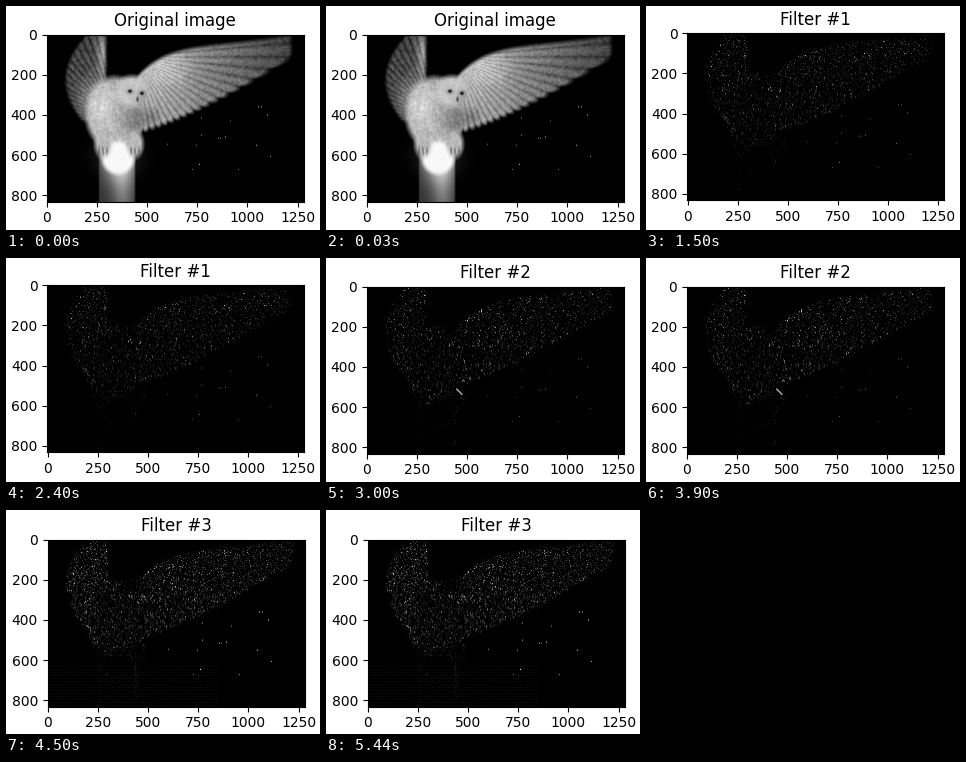
Recreate the animation shown at these times as a matplotlib script. Size 314 by 224 pixels, loop 6060 ms.

```python
import numpy as np
import matplotlib.pyplot as plt
from matplotlib.animation import FuncAnimation

STAGE_W, STAGE_H, DPI = 314, 224, 100
W, H, S = 257, 167, 2          # picture size in pixels, supersampling
X0, Y0 = 41, 29                # stage position of the picture

rng = np.random.default_rng(7)
rows, cols = np.mgrid[0:H * S, 0:W * S]
X = X0 + (cols + 0.5) / S
Y = Y0 + (rows + 0.5) / S

stars = [(int(x), int(y)) for x, y in
         zip(rng.uniform(120, 235, 16), rng.uniform(70, 135, 16))
         if y > 115 - 0.4 * x]


def blur(a, n):
    kernel = np.bartlett(2 * n + 3)[1:-1]
    kernel /= kernel.sum()

    def smooth(line):
        return np.convolve(np.pad(line, n, mode="edge"), kernel, "valid")

    return np.apply_along_axis(smooth, 1, np.apply_along_axis(smooth, 0, a))


def inside(*distances, soft=2):
    """Soft mask of the points where every distance is positive."""
    return np.prod([np.clip(d / soft + 0.5, 0, 1) for d in distances], axis=0)


def ellipse(x, y, rx, ry, soft=0.15):
    d = np.hypot((X - x) / rx, (Y - y) / ry)
    return np.clip((1 + soft - d) / (2 * soft), 0, 1)


def glow(x, y, rx, ry):
    return np.exp(-((X - x) / rx) ** 2 - ((Y - y) / ry) ** 2)


def barbs(x, y, count):
    """Feather lines fanning out from a pivot."""
    return np.abs(np.sin(count * np.arctan2(Y - y, X - x))) ** 0.6


def shrink(a):
    return a.reshape(H, S, W, S).mean(axis=(1, 3))


def draw_owl():
    pic = np.zeros_like(X)

    def paint(tone, mask):
        pic[:] = pic * (1 - mask) + tone * mask

    mottle = blur(rng.normal(0, 1, X.shape), 2) * 0.13

    column = inside(X - 93, 129 - X, Y - 148)
    paint(0.2 + 0.5 * glow(114, 150, 15, 30) + 0.2 * glow(117, 190, 10, 45),
          column)

    # Raised wing
    edge = 60 + 20 * ((Y - 75) / 44) ** 2
    left = inside(X - edge, 100 - X, 116 - Y, soft=4)
    paint(0.1 + 0.2 * barbs(112, 112, 36) + 0.35 * glow(97, 48, 6, 22)
          + 0.4 * glow(92, 95, 18, 22) + mottle, left)

    # Spread wing
    t = np.clip((X - 130) / 155, 0, 1)
    top = 31 + 12 * (1 - t ** 2) + 30 * (1 - t) ** 6
    bottom = 124 - 74 * t ** 1.3
    feathers = barbs(130, 52, 34)
    right = inside(X - 130, 285 - X, Y - top, bottom + 3 * feathers - Y,
                   soft=5)
    paint(0.52 - 0.4 * t + (0.24 - 0.08 * t) * feathers
          + 0.15 * glow(160, 62, 25, 20) - 0.2 * glow(143, 112, 10, 10)
          + mottle, right)

    body = ellipse(109, 108, 29, 36, 0.1)
    paint(0.66 + 0.16 * glow(95, 102, 16, 26) - 0.2 * glow(132, 116, 14, 14)
          + 1.2 * mottle, body)

    head = ellipse(126, 86, 16, 15, 0.2)
    paint(0.78 - 0.15 * glow(138, 94, 9, 10) + 0.5 * mottle, head)
    for x, y in [(124, 86), (136, 88)]:
        paint(0.45, 0.5 * ellipse(x, y, 4, 3, 0.4))
        paint(0.08, ellipse(x, y, 1.8, 1.4, 0.4))
    paint(0.2, 0.8 * ellipse(131.5, 94, 1.2, 2.5, 0.4))

    # Lamp under the feet
    pic[:] += 0.2 * glow(112, 151, 20, 18)
    paint(0.97, ellipse(112, 152, 16, 16))
    for x in (97, 129):
        paint(0.72 + mottle, ellipse(x, 138, 8, 13, 0.3))
        for dx in (-4, 0, 4):
            paint(0.3, 0.6 * ellipse(x + dx, 145, 0.8, 4, 0.4))

    cover = np.clip(left + right + body, 0, 1)
    return shrink(np.clip(pic, 0, 1)), shrink(cover)


def add_stars(pic, level):
    for k, (x, y) in enumerate(stars):
        pic[y, x] = max(pic[y, x], level * (0.6 + 0.2 * (k % 3)))
    return pic


def speckle(edges, density, gain, star_level):
    """Sparse filter response, strongest along edges."""
    keep = rng.random(edges.shape) < density
    dots = edges * keep * rng.exponential(1, edges.shape) * gain
    return add_stars(np.clip(dots, 0, 0.8), star_level)


owl, cover = draw_owl()
slope = np.hypot(*np.gradient(owl))
edges = np.clip(1.6 * slope, 0, 0.35) * (0.25 + 0.75 * cover) + 0.08 * cover
edges[:2] = 0

first = speckle(edges, 0.28, 0.6, 0.45)
second = speckle(edges, 0.24, 0.75, 0.4)
third = speckle(edges, 0.42, 0.75, 0.9)

stroke = np.arange(6)          # bright claw
second[102 + stroke, 89 + stroke] = 0.9
second[102 + stroke, 90 + stroke] = 0.45

lines = third[126::3, :170]    # faint rows near the floor
lines += 0.05 * rng.random(lines.shape)

fig = plt.figure(figsize=(STAGE_W / DPI, STAGE_H / DPI), dpi=DPI,
                 facecolor="white")


def panel(title, pic, left, top):
    ax = fig.add_axes([left / STAGE_W, 1 - (top + H) / STAGE_H,
                       W / STAGE_W, H / STAGE_H])
    ax.imshow(pic, cmap="gray", vmin=0, vmax=1, aspect="auto",
              extent=(-0.5, 1279.5, 831.5, -0.5))
    ax.set_xticks(range(0, 1251, 250))
    ax.set_yticks(range(0, 801, 200))
    ax.set_title(title, fontsize=12)
    return ax


panels = [panel("Original image", add_stars(owl.copy(), 0.75), 40.6, 28.6),
          panel("Filter #1", first, 41.4, 27.2),
          panel("Filter #2", second, 40.6, 28.6),
          panel("Filter #3", third, 41.6, 29.6)]


def show(i):
    current = min(i // 25, 3)
    for k, ax in enumerate(panels):
        ax.set_visible(k == current)
    return panels


anim = FuncAnimation(fig, show, frames=101, interval=60, repeat=True,
                     repeat_delay=0, blit=False)
plt.show()
```
